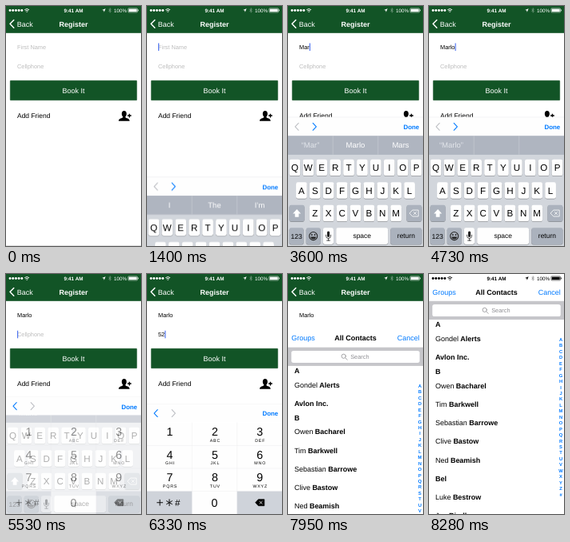
These frames come from a looping animation (169 by 300 pixels, 8.35 s). An HTML page:

```html
<!DOCTYPE html>
<html lang="en">
<head>
<meta charset="utf-8">
<title>Register form</title>
<style>
  html, body { margin: 0; width: 100%; height: 100%; overflow: hidden; background: #fff; }
  svg { display: block; width: 100vw; height: 100vh; }
  text { font-family: "Liberation Sans", Arial, sans-serif; font-size: 17px; text-rendering: geometricPrecision; white-space: pre; }
  .b { font-weight: 700; }
  .mid { text-anchor: middle; }
  .end { text-anchor: end; }
  .line { fill: none; stroke-linecap: round; stroke-linejoin: round; }
  .s12 { font-size: 12px; }
  .s14 { font-size: 14px; }
  .s15 { font-size: 15px; }
  .s16 { font-size: 16px; }
  .s18 { font-size: 18px; }
  .s22 { font-size: 22px; }
  .blue { fill: #007aff; }
  .hint { fill: #bdbdbd; }
  #keys, #bar, #alpha, #pad, #contacts, #status { animation: 8350ms linear infinite; }
  #keys { animation-name: keys; }
  #bar { animation-name: bar; }
  #alpha { animation-name: alpha; }
  #pad { animation-name: pad; }
  #contacts { animation-name: contacts; }
  #status { animation-name: status; }
  @keyframes keys {
    0%, 15.93% { transform: translateY(306px); animation-timing-function: cubic-bezier(.2, .7, .3, 1); }
    20.72%, 84.67% { transform: none; animation-timing-function: cubic-bezier(.2, .7, .3, 1); }
    89.46%, 100% { transform: translateY(306px); }
  }
  @keyframes bar {
    0%, 64.67% { transform: none; animation-timing-function: ease-out; }
    68.26%, 100% { transform: translateY(44px); }
  }
  @keyframes alpha {
    0%, 64.67% { opacity: 1; }
    68.26%, 100% { opacity: 0; }
  }
  @keyframes pad {
    0%, 64.67% { opacity: 0; }
    68.26%, 100% { opacity: 1; }
  }
  @keyframes contacts {
    0%, 93.65% { transform: translateY(568px); animation-timing-function: cubic-bezier(.15, .75, .25, 1); }
    98.9%, 100% { transform: none; }
  }
  @keyframes status {
    0%, 95.5% { color: #fff; }
    97%, 100% { color: #000; }
  }
</style>
</head>
<body>
<svg viewBox="0 0 320 568" preserveAspectRatio="none">
  <g id="form">
    <rect width="320" height="568" fill="#fff"/>
    <rect y="566.2" width="320" height="1.8" fill="#dedede"/>
    <rect width="320" height="64" fill="#125426"/>
    <path class="line" d="M18.5 33 9.5 42.3 18.5 51.6" stroke="#fff" stroke-width="2.8"/>
    <text x="26" y="48.5" fill="#fff">Back</text>
    <text class="b mid" x="160" y="48.5" fill="#fff">Register</text>
    <text class="s14 hint" id="hint0" x="26.5" y="102">First Name</text>
    <text class="s14" id="field0" x="26.5" y="102"></text>
    <text class="s14 hint" id="hint1" x="26.5" y="148">Cellphone</text>
    <text class="s14" id="field1" x="26.5" y="148"></text>
    <rect id="mask" x="58.7" y="136.3" height="15.2"/>
    <rect id="caret" width="2" height="18" fill="#3d66f0"/>
    <rect x="10" y="176.6" width="300" height="46.3" rx="1" fill="#125426" stroke="#0e4a20"/>
    <text class="mid" x="160" y="206" fill="#fff" font-size="16.5">Book It</text>
    <text class="s16" x="26.5" y="266">Add Friend</text>
    <ellipse cx="280" cy="255" rx="5.7" ry="7.2"/>
    <path d="M277 259h6v4c1 3 10 2 10 9h-26c0-7 9-6 10-9z"/>
    <path d="M292.5 255v9M288 259.5h9" stroke="#000" stroke-width="2.6"/>
  </g>
  <g id="keys">
    <g id="alpha"></g>
    <g id="pad"></g>
    <g id="bar">
      <rect y="263" width="320" height="44" fill="#fefefe"/>
      <path d="M0 263h320" stroke="#e6e7e9" stroke-width=".7"/>
      <path id="prev" class="line" d="M25 277 17 285.5 25 294" stroke-width="2"/>
      <path id="next" class="line" d="M59 277 67 285.5 59 294" stroke-width="2"/>
      <text class="b s15 blue end" x="311" y="292">Done</text>
    </g>
  </g>
  <g id="contacts">
    <rect width="320" height="568" fill="#fff"/>
    <text class="blue" x="8" y="48.5">Groups</text>
    <text class="b mid" x="160" y="48.5">All Contacts</text>
    <text class="blue end" x="312" y="48.5">Cancel</text>
    <rect y="64" width="320" height="44" fill="#c6c6ca"/>
    <rect x="8" y="72" width="304" height="28.5" rx="5" fill="#fff"/>
    <g class="line" stroke="#8e8e93" stroke-width="1.5"><circle cx="132" cy="85" r="5"/><path d="m136 89 4.5 4.5"/></g>
    <text class="s14" x="148" y="91" fill="#8e8e93">Search</text>
  </g>
  <g id="status" fill="currentColor">
    <g id="dots"></g>
    <path class="line" d="M44.5 8.5q5-4.5 10 0M46.5 11q3-2.7 6 0" stroke="currentColor" stroke-width="1.7"/>
    <circle cx="49.5" cy="13.5" r="1.3"/>
    <text class="s12 b mid" x="160" y="14.5">9:41 AM</text>
    <path d="M236 6 232.5 14.5 231.5 10.5 227.5 9.5z"/>
    <path class="line" d="M243.5 7.5 249 13 246.2 15.5V5L249 7.5 243.5 13" stroke="currentColor" opacity=".55"/>
    <text class="s12" x="255.5" y="14.5">100%</text>
    <rect x="289.5" y="5.5" width="22" height="9.5" rx="1.5" fill="none" stroke="currentColor"/>
    <rect x="291" y="7" width="19" height="6.5"/>
    <rect x="312.5" y="8.5" width="1.5" height="3.5"/>
  </g>
</svg>
<script>
const LOOP = 8350;
const $ = id => document.getElementById(id);

function add(parent, tag, attrs, text) {
  const node = document.createElementNS("http://www.w3.org/2000/svg", tag);
  for (const k in attrs) node.setAttribute(k, attrs[k]);
  if (text !== undefined) node.textContent = text;
  parent.append(node);
  return node;
}
const box = (p, x, y, width, height, fill, rx = 0) => add(p, "rect", { x, y, width, height, fill, rx });
const label = (p, x, y, text, cls, fill = "#000") => add(p, "text", { x, y, class: cls, fill }, text);
const path = (p, d, attrs) => add(p, "path", { d, class: "line", ...attrs });

for (let i = 0; i < 5; i++) add($("dots"), "circle", { cx: 9.5 + i * 7, cy: 10.3, r: 2.8 });

// Letter keyboard
const alpha = $("alpha");
const WHITE = "#fefefe", DARK = "#abb2bd", PRESSED = "#d2d6dc";
box(alpha, 0, 307, 320, 261, "#d2d6dc");
box(alpha, 0, 307, 320, 45, "#afb5c0");
for (const x of [106.5, 213.5]) path(alpha, `M${x} 308v43`, { stroke: "#c9cdd5", "stroke-width": 1.2 });
const guesses = [53, 160, 267].map(x => label(alpha, x, 336, "", "mid s18", "#fff"));

function key(x, y, w, fill) {
  box(alpha, x, y + 1.2, w, 39, "#8a8d92", 4.5);
  return box(alpha, x, y, w, 39, fill, 4.5);
}
const spots = {};
[["QWERTYUIOP", 3], ["ASDFGHJKL", 19], ["ZXCVBNM", 51]].forEach(([row, left], r) => {
  [...row].forEach((ch, i) => {
    const x = left + i * 32, y = 363 + r * 54;
    key(x, y, 26, WHITE);
    label(alpha, x + 13, y + 27, ch, "mid s22");
    spots[ch] = [x, y];
  });
});
const shift = key(3, 471, 36, DARK);
const arrow = add(alpha, "path", { d: "M21 481 30.5 491.5H25.5V499.5H16.5V491.5H11.5z" });
key(281, 471, 36, DARK);
function eraser(p, x, y, fill, stroke, cross) {
  add(p, "path", { d: `M${x - 11} ${y}l7-7.5h14v15h-14z`, fill, stroke, "stroke-width": 1.5, "stroke-linejoin": "round" });
  path(p, `M${x - 1} ${y - 3}l6 6m0-6l-6 6`, { stroke: cross, "stroke-width": 1.5 });
}
eraser(alpha, 299, 490.5, "none", "#fff", "#fff");
for (const [x, w, fill] of [[3, 34, DARK], [43, 34, DARK], [83, 25, WHITE], [114, 123, WHITE], [243, 74, DARK]])
  key(x, 525, w, fill);
label(alpha, 20, 550.5, "123", "mid s16");
label(alpha, 175.5, 549.5, "space", "mid s16");
label(alpha, 280, 549.5, "return", "mid s16");
add(alpha, "circle", { cx: 60, cy: 544.5, r: 9.5, fill: "none", stroke: "#222", "stroke-width": 2 });
for (const cx of [56.5, 63.5]) add(alpha, "circle", { cx, cy: 541.5, r: 1.7, fill: "#222" });
add(alpha, "path", { d: "M53.5 546h13q-1 5.5-6.5 5.5t-6.5-5.5z", fill: "#222" });
box(alpha, 92.7, 533, 6, 14, "#222", 3);
path(alpha, "M90 542v2q0 6 5.7 6t5.7-6v-2M95.7 550v5M92 555h7.5", { stroke: "#222", "stroke-width": 1.5 });

const balloon = add(alpha, "g", {});
const bubble = add(balloon, "path", { fill: WHITE, stroke: "#b4b8be", "stroke-width": .7 });
const bubbleText = label(balloon, 0, 0, "", "mid");
bubbleText.style.fontSize = "34px";

// Number pad
const pad = $("pad");
const cells = {};
box(pad, 0, 352, 320, 216, WHITE);
["", "ABC", "DEF", "GHI", "JKL", "MNO", "PQRS", "TUV", "WXYZ"].forEach((letters, i) => {
  const x = i % 3 * 106.7, y = 352 + Math.floor(i / 3) * 54, cx = x + 54;
  cells[i + 1] = box(pad, x, y, 106.7, 54, WHITE);
  label(pad, cx, y + 30.5, i + 1, "mid").style.fontSize = "27px";
  const small = label(pad, cx + 1, y + 45, letters, "mid");
  small.style.cssText = "font-size:10px;letter-spacing:1.6px";
});
box(pad, 0, 514, 106.7, 54, "#cfd3da");
box(pad, 213.4, 514, 106.7, 54, "#cfd3da");
label(pad, 160, 551, "0", "mid").style.fontSize = "27px";
path(pad, "M24 541h13M30.5 534.5v13M53 533.5v15M46.5 537.2l13 7.5M59.5 537.2l-13 7.5", { stroke: "#000", "stroke-width": 1.8 });
label(pad, 72.5, 549, "#", "mid s22");
eraser(pad, 268, 541, "#000", "#000", "#fff");
path(pad, "M0 406h320M0 460h320M0 514h320M106.7 352v216M213.4 352v216", { stroke: "#e9eaec", "stroke-width": .8 });

// Contact list
const list = $("contacts");
const header = (y, text) => label(list, 15, y + 17, text, "b");
function person(y, name) {
  const cut = name.endsWith("Inc.") ? 0 : name.indexOf(" ") + 1;
  const row = label(list, 15, y + 28, name.slice(0, cut), "");
  add(row, "tspan", { class: "b" }, name.slice(cut));
}
header(108, "A");
["Gondel Alerts", "Avlon Inc."].forEach((n, i) => person(131 + i * 44, n));
header(219, "B");
["Owen Bacharel", "Tim Barkwell", "Sebastian Barrowe", "Clive Bastow", "Ned Beamish", "Bel", "Luke Bestrow", "Joe Bindle"]
  .forEach((n, i) => person(242 + i * 44, n));
[..."ABCDEFGHIJKLMNOPQRSTUVWXYZ#"].forEach((ch, i) => {
  label(list, 312.5, 159 + i * 14.1, ch, "b mid", "#007aff").style.fontSize = "11px";
});

// Typing
const NAME = "Marlo", NAME_AT = [2530, 2930, 3400, 3870, 4330];
const PHONE = "5294", PHONE_AT = [6000, 6200, 6400, 6530];
const MASK_AT = [6600, 6930, 7000];
const FOCUS = 1400, SWITCH = 5400, DONE = 7070;
const WORDS = [["I", "The", "I’m"], ["“M”", "My", "Me"], ["“Ma”", "May", "Mad"],
  ["“Mar”", "Marlo", "Mars"], ["“Marl”", "Marlo", "Marls"], ["“Marlo”", "", ""]];
const passed = (times, t) => times.filter(at => at <= t).length;
const show = (node, on) => node.setAttribute("visibility", on ? "inherit" : "hidden");

function drawBalloon(t, n) {
  const on = n > 0 && t - NAME_AT[n - 1] < 120;
  show(balloon, on);
  if (!on) return;
  const ch = NAME[n - 1].toUpperCase(), [x, y] = spots[ch];
  bubble.setAttribute("d", `M${x} ${y + 35}v-38q-8-7-8-14v-32q0-6 6-6h30q6 0 6 6v32q0 7-8 14v38q0 4-4 4h-18q-4 0-4-4z`);
  bubbleText.setAttribute("x", x + 13);
  bubbleText.setAttribute("y", y - 17);
  bubbleText.textContent = ch;
}

function drawCaret(t, second, last) {
  show($("caret"), t >= FOCUS && t < DONE);
  const field = $(second ? "field1" : "field0");
  const masked = second ? 7 * passed(MASK_AT, t) : 0;
  const width = field.textContent ? field.getComputedTextLength() : 0;
  const p = (t - last) % 1000;
  $("caret").setAttribute("x", 26.7 + width + masked);
  $("caret").setAttribute("y", second ? 134 : 88);
  $("caret").setAttribute("opacity", p < 500 ? 1 : p < 750 ? 1 - (p - 500) / 250 : p / 250 - 3);
}

function draw(t) {
  const n = passed(NAME_AT, t), m = passed(PHONE_AT, t), second = t >= SWITCH;
  $("field0").textContent = NAME.slice(0, n);
  $("field1").textContent = PHONE.slice(0, m);
  show($("hint0"), !n);
  show($("hint1"), !m);
  $("mask").setAttribute("width", 7 * passed(MASK_AT, t));
  guesses.forEach((g, i) => {
    g.textContent = WORDS[n][i];
    g.setAttribute("fill", n && !i ? "#e2e5ea" : "#fff");
  });
  shift.setAttribute("fill", n ? DARK : WHITE);
  arrow.setAttribute("fill", n ? "#fff" : "#000");
  $("prev").setAttribute("stroke", second ? "#007aff" : "#bcbec3");
  $("next").setAttribute("stroke", second ? "#bcbec3" : "#007aff");
  [...PHONE].forEach((d, i) => {
    const down = t >= PHONE_AT[i] && t < PHONE_AT[i] + 90;
    cells[d].setAttribute("fill", down ? PRESSED : WHITE);
  });
  drawBalloon(t, n);
  const last = Math.max(FOCUS, ...[...NAME_AT, SWITCH, ...PHONE_AT, ...MASK_AT].filter(at => at <= t));
  drawCaret(t, second, last);
}

let start;
function tick(now) {
  start ??= now;
  draw((now - start) % LOOP);
  requestAnimationFrame(tick);
}
draw(0);
requestAnimationFrame(tick);
</script>
</body>
</html>
```
